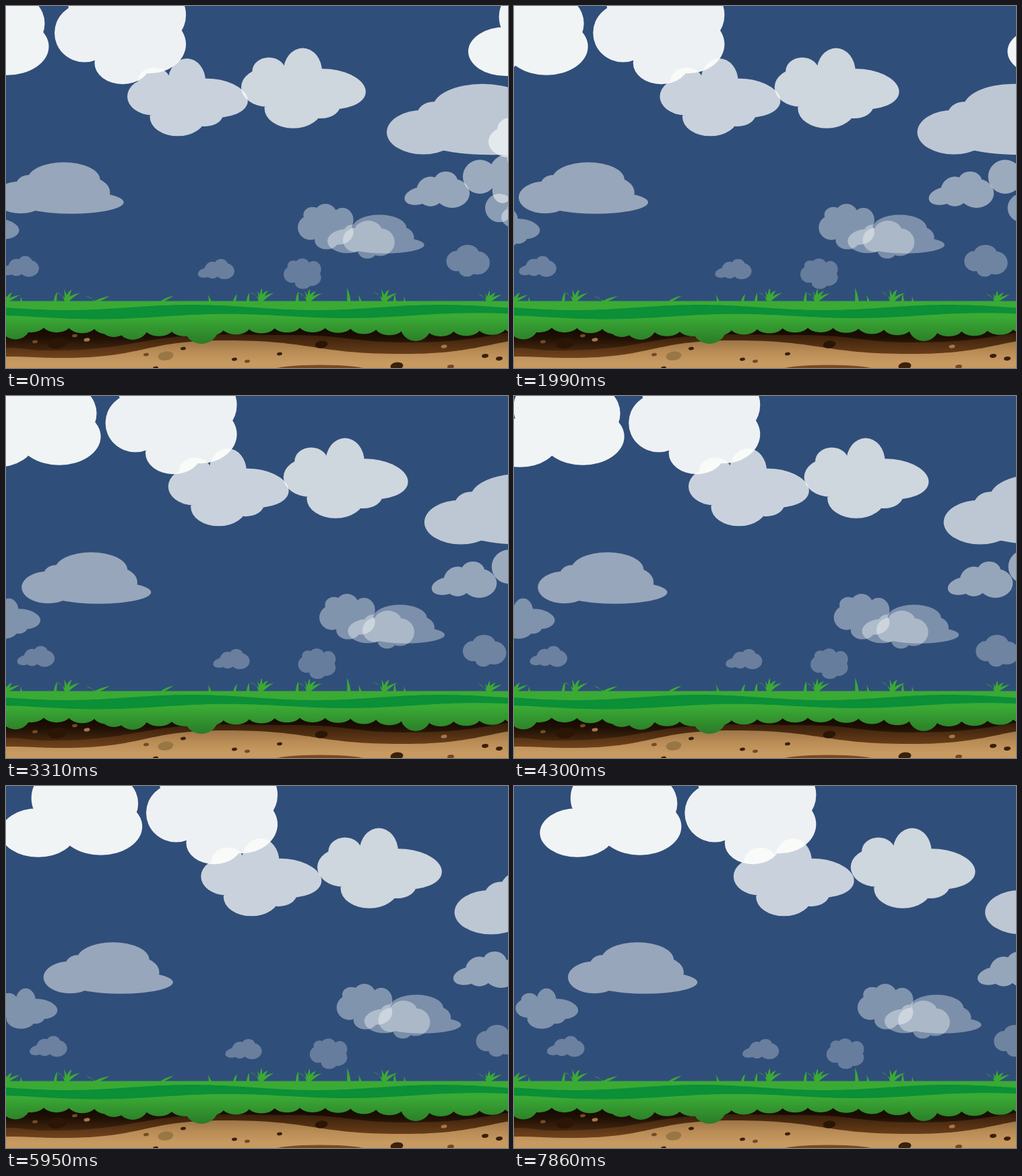
An HTML page with a canvas for the animation above (8000 ms loop, 745 by 538 pixels).

```html
<!DOCTYPE html>
<html lang="en">
<head>
<meta charset="utf-8">
<title>Drifting clouds</title>
<style>
  html, body { margin: 0; width: 100%; height: 100%; overflow: hidden; background: #304e7a; }
  canvas { display: block; }
</style>
</head>
<body>
<canvas id="stage" width="745" height="538"></canvas>
<script>
const W = 745, H = 538, GROUND = 438.5;
const LOOP = 8000, TICK = 330, PHASE = 60, STEP = 7.63;
const GREEN = '#3aaa35';
const ctx = document.getElementById('stage').getContext('2d');

// Clockwise lobes [x, y, rx, ry, tilt] at full size; the space between their centres is filled too.
const shapes = {
  bank: [[55, 42, 55, 36], [90, -9, 45, 45], [159, -1, 43, 42], [147, 33, 61, 42]],
  puff: [[47, -2, 47, 35], [50, -31, 30, 25], [111, -30, 35, 43], [157, 1, 68, 36, 0.1],
    [144, 30, 35, 24], [94, 36, 52, 36]],
  flat: [[74, 26, 74, 45], [95, -8, 34, 28], [194, -23, 101, 49], [252, 12, 71, 45], [215, 40, 146, 32]],
  tail: [[40, 18, 40, 24, -0.25], [74, 5, 40, 42], [117, -24, 33, 27], [135, 10, 49, 41]],
  bunch: [[45, 3, 45, 44], [52, -42, 32, 28], [98, -43, 40, 38], [158, -24, 39, 43],
    [142, 20, 55, 44], [102, 48, 42, 32]],
  clover: [[48, 2, 48, 47], [98, -33, 53, 40], [144, 10, 57, 54], [95, 44, 37, 30]],
  knot: [[45, -4, 45, 45], [121, -18, 50, 46], [105, 32, 27, 34]]
};

// Left edge and centre height of every cloud; its height in the sky sets its depth.
const clouds = [
  ['tail', -7, 387], ['tail', 284.5, 391], ['bunch', 412, 398], ['clover', 653.5, 378.5],
  ['clover', 500, 347], ['flat', 477, 339], ['puff', 735, 315], ['puff', -73.5, 331],
  ['bunch', 433, 328], ['knot', 711, 302], ['tail', 591, 273], ['flat', -17.5, 270.5],
  ['knot', 678, 256], ['puff', 716, 203], ['flat', 565, 168.5], ['puff', 180, 136],
  ['puff', 349, 122.5], ['bunch', 72, 37], ['bank', -146.5, 27], ['bank', 686, 25]
];

// Tufts: x, height, blades. Stalks: x, lean, height.
const tufts = [[1, 15, 4], [90, 20, 4], [134, 12, 2], [378, 20, 5], [449, 19, 5], [561, 20, 4], [716, 16, 5]];
const stalks = [[23, -1, 7], [73, 3, 13], [231, 18, 8], [303, -4, 11], [339, 4, 10], [359, 2, 12],
  [432, 2, 14], [509, -3, 20], [526, -3, 10], [577, 0, 11], [592, -1, 7]];

// Large hanging lumps of turf: x, bottom, radius
const lumps = [[14, 495.5, 23], [160, 492, 24], [188, 496, 25], [290, 502, 26], [608, 498, 23]];

// Pebbles by colour: x, y, half width
const pebbles = {
  '#2b1606': [[76, 501, 14], [468, 503, 9.5]],
  '#3b200a': [[263, 509, 4], [222, 538, 4], [339, 525, 4], [406, 517, 4], [580, 535, 9.5],
    [711, 520, 5], [732, 524, 5]],
  '#744a26': [[43, 499, 4], [102, 490, 4], [208, 518, 4], [358, 528, 4], [660, 536, 5]],
  '#a5764c': [[120, 496, 4.5], [650, 506, 4.5]],
  '#997744': [[237, 520, 11.5]]
};

const wave = (x, peak, period) => Math.cos((x - peak) * 2 * Math.PI / period);
const stripeTop = x => 448 + 4 * wave(x, 460, 370);
const stripeBottom = x => 462.5 - x / 250 + 3.5 * wave(x, 510, 370);
const turfEdge = x => 480 - 3 * wave(x, 445, 390);

function gradient(y0, y1, ...colors) {
  const g = ctx.createLinearGradient(0, y0, 0, y1);
  colors.forEach((c, i) => g.addColorStop(i / (colors.length - 1), c));
  return g;
}

function addEllipse(x, y, rx, ry, tilt = 0) {
  ctx.moveTo(x + rx * Math.cos(tilt), y + rx * Math.sin(tilt));
  ctx.ellipse(x, y, rx, ry, tilt, 0, Math.PI * 2);
}

function fillBelow(points, fill) {
  ctx.fillStyle = fill;
  ctx.beginPath();
  ctx.moveTo(...points[0]);
  for (let i = 1; i < points.length; i++) {
    const [x0, y0] = points[i - 1], [x1, y1] = points[i], mid = (x0 + x1) / 2;
    ctx.bezierCurveTo(mid, y0, mid, y1, x1, y1);
  }
  ctx.lineTo(points[points.length - 1][0], H);
  ctx.lineTo(0, H);
  ctx.fill();
}

function drawCloud([name, x, y], travel) {
  const depth = (542 - y) / 510;
  ctx.save();
  ctx.translate(x + travel * depth, y);
  ctx.scale(depth, depth);
  ctx.fillStyle = `rgba(253,254,252,${0.94 * Math.min(depth, 1)})`;
  ctx.beginPath();
  shapes[name].forEach(([cx, cy]) => ctx.lineTo(cx, cy));
  ctx.closePath();
  shapes[name].forEach(lobe => addEllipse(...lobe));
  ctx.fill();
  ctx.restore();
}

function drawSoil() {
  ctx.fillStyle = gradient(474, 513, '#100700', '#1f1005', '#45270f');
  ctx.fillRect(0, 470, W, H - 470);
  fillBelow([[0, 508], [62, 512], [330, 488], [420, 489], [600, 500], [850, 478]],
    gradient(486, 522, '#351d09', '#6f421c'));
  fillBelow([[0, 521], [85, 523], [325, 497], [588, 517], [850, 490]],
    gradient(497, 530, '#9c7446', '#b98c56', '#c79a62'));
  for (const [color, stones] of Object.entries(pebbles)) {
    ctx.fillStyle = color;
    ctx.beginPath();
    stones.forEach(([x, y, r]) => addEllipse(x, y, r, r * 0.58, -0.12));
    ctx.fill();
  }
  ctx.fillStyle = '#784823';
  ctx.beginPath();
  addEllipse(466, 541, 70, 7.5);
  ctx.fill();
}

function drawTurf() {
  ctx.fillStyle = gradient(462, 500, GREEN, '#2b7d28');
  ctx.beginPath();
  ctx.rect(0, GROUND, W, 476 - GROUND);
  for (let x = -1; x < W + 20; x += 38) addEllipse(x, turfEdge(x) - 6, 22, 14);
  lumps.forEach(([x, bottom, r]) => addEllipse(x, bottom - r, r, r));
  ctx.fill();

  ctx.fillStyle = '#0b8f37';
  ctx.beginPath();
  for (let x = 0; x <= W; x += 5) ctx.lineTo(x, stripeTop(x));
  for (let x = W; x >= 0; x -= 5) ctx.lineTo(x, stripeBottom(x));
  ctx.fill();
}

function drawBlade(x, lean, height, w) {
  const tipX = x + lean, tipY = GROUND - height;
  ctx.beginPath();
  ctx.moveTo(x - w, GROUND + 1);
  ctx.quadraticCurveTo(x + lean * 0.25 - w * 0.6, tipY + 3, tipX, tipY);
  ctx.quadraticCurveTo(x + lean * 0.35 + w * 0.6, tipY + 7, x + w, GROUND + 1);
  ctx.fill();
}

function drawGrass() {
  ctx.fillStyle = GREEN;
  for (const [x, height, count] of tufts) {
    for (let i = 0; i < count; i++) {
      const side = -0.9 + 2 * i / (count - 1);
      drawBlade(x, side * 18, height * (1 - 0.35 * Math.abs(side)), 2.8);
    }
  }
  stalks.forEach(([x, lean, height]) => drawBlade(x, lean, height, 1.2 + height * 0.08));
}

function frame(now) {
  const travel = STEP * Math.floor((now % LOOP + PHASE) / TICK);
  ctx.fillStyle = '#304e7a';
  ctx.fillRect(0, 0, W, H);
  clouds.forEach(cloud => drawCloud(cloud, travel));
  drawSoil();
  drawTurf();
  drawGrass();
}

const start = performance.now();
function tick() {
  frame(performance.now() - start);
  requestAnimationFrame(tick);
}
tick();
</script>
</body>
</html>
```
